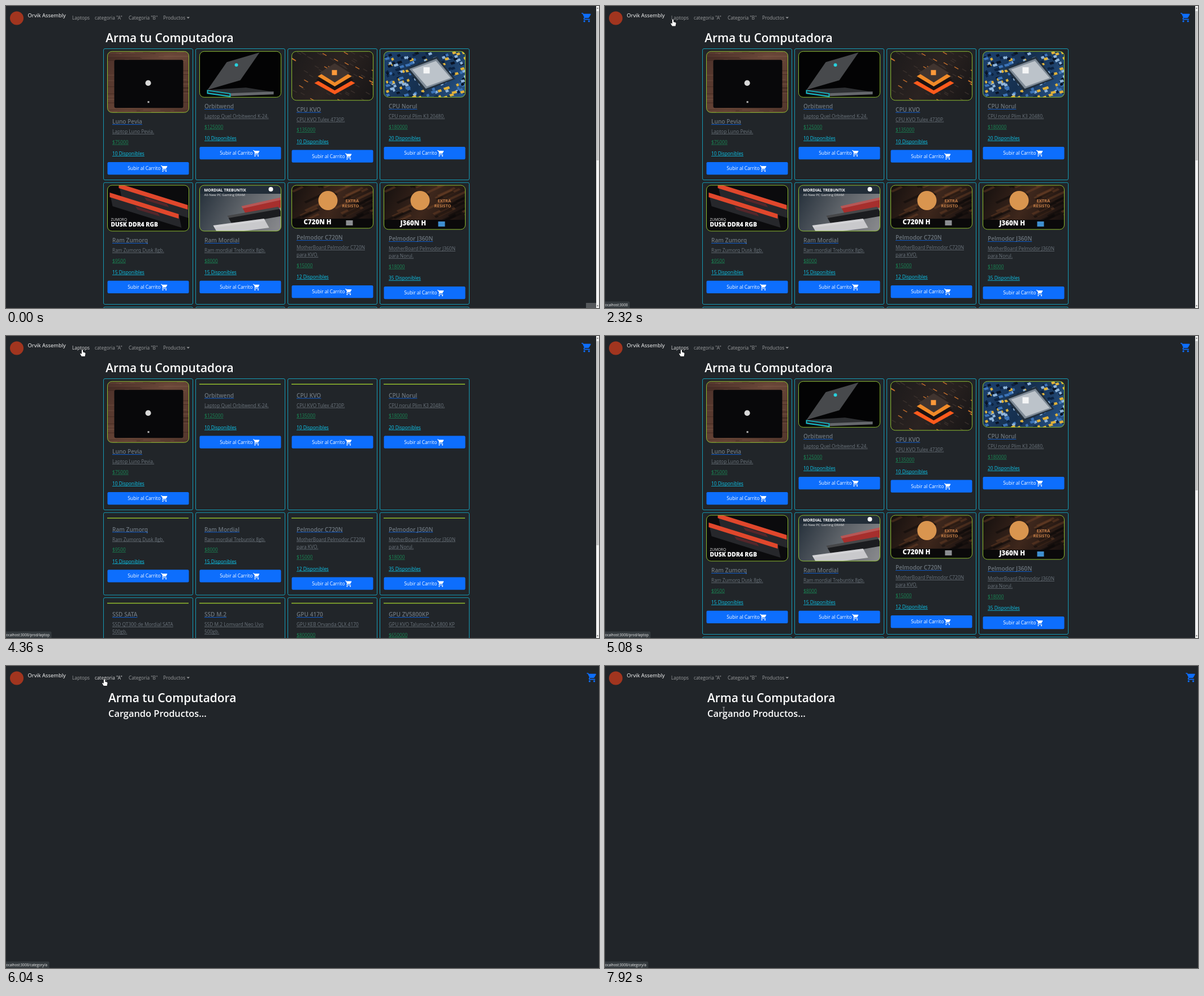
An HTML page with a canvas for the animation above (7.99 s loop, 1049 by 534 pixels).

```html
<!DOCTYPE html>
<html lang="es">
<head>
<meta charset="utf-8">
<title>Tienda</title>
<style>
html, body { margin: 0; width: 100%; height: 100%; overflow: hidden; background: #212529; }
canvas { display: block; }
</style>
</head>
<body>
<canvas id="stage" width="1049" height="534"></canvas>
<script>
const c = document.getElementById('stage').getContext('2d');
const LOOP = 7990, BG = '#212529', BLUE = '#0d6efd', CYAN = '#0dcaf0', GRAY = '#6c757d', GREEN = '#198754';
const FONT = '"Open Sans", "Noto Sans", sans-serif';
const PIC = 144, COL = 163, LINE = 13.3, FLAT = 8.5;
const HAND = new Path2D('M-1.1 1Q0-.6 1.1 1V4.6L4.4 5.4Q5.8 5.8 5.5 7.4L4.6 12H-1.2L-3.7 8Q-4 6.6-2.6 6.8L-1.1 8Z');
const ARROW = new Path2D('M0 0V11.5L2.6 9.2 4.3 13 6 12.2 4.3 8.6H7.8Z');
const CART = new Path2D('M1 2H4.3L5.2 4H20Q21.4 4.2 20.9 5.5L17.3 12Q16.7 13 15.5 13H8.1L7.2 14.7Q7.2 15 7.4 15H19V17H7Q4.5 16.6 5.2 14.1L6.6 11.6 3 4H1ZM5 20a2 2 0 1 0 4 0a2 2 0 1 0-4 0ZM15 20a2 2 0 1 0 4 0a2 2 0 1 0-4 0Z');

function rect(color, x, y, w, h, r = 0) {
  c.fillStyle = color;
  c.beginPath();
  c.roundRect(x, y, w, h, r);
  c.fill();
}

// Parallelogram from a corner and two edge vectors
function slab(color, x, y, ux, uy, vx, vy) {
  c.save();
  c.transform(ux, uy, vx, vy, x, y);
  rect(color, 0, 0, 1, 1);
  c.restore();
}

const diamond = (color, x, y, rx, ry) => slab(color, x - rx, y, rx, -ry, rx, ry);

function dot(color, x, y, r) {
  rect(color, x - r, y - r, 2 * r, 2 * r, r);
}

function text(s, x, y, size, color, weight = 400, line) {
  c.font = `${weight} ${size}px ${FONT}`;
  c.fillStyle = color;
  c.fillText(s, x, y);
  if (line) rect(line, x, y + 1, c.measureText(s).width, .7);
}

function cart(x, y, size, color) {
  c.save();
  c.translate(x, y);
  c.scale(size / 24, size / 24);
  c.fillStyle = color;
  c.fill(CART);
  c.restore();
}

function backdrop(h, ...colors) {
  const g = c.createLinearGradient(0, 0, PIC, h);
  colors.forEach((k, i) => g.addColorStop(i / (colors.length - 1), k));
  rect(g, 0, 0, PIC, h);
}

// Calls draw(x, y, rand) n times with a repeatable random source
function scatter(n, h, draw) {
  let seed = 77;
  const rand = () => (seed = (seed * 16807) % 2147483647) / 2147483647;
  for (let i = 0; i < n; i++) draw(rand() * PIC, rand() * h, rand);
}

// Product pictures
function blackLaptop(h) {
  backdrop(h, '#4b3029', '#6a4738', '#54372d');
  scatter(70, h, (x, y, r) => rect(r() < .5 ? '#35211b90' : '#86604e70', x - 30, y, 60, 1));
  rect('#08080a', 12, 15, 122, 85, 3);
  dot('#d8d8d8', 72, 56, 5);
  rect('#bbb', 71, 88, 3, 3);
}

function slateLaptop(h) {
  rect('#030304', 0, 0, PIC, h);
  slab('#47494c', 48, 19, 58, -17, -34, 49);
  slab('#2e3033', 14, 68, 68, -4, 50, 8);
  slab('#66696d', 55, 74, 76, -3, 0, 5);
  slab('#19b8c4', 13, 68, 42, 6, 0, 7);
  slab('#202225', 15, 70, 38, 5.5, 0, 3);
  dot('#28d0dc', 65, 24, 3);
}

function glowingChip(h) {
  backdrop(h, '#1c1a1b', '#2b2321', '#171516');
  scatter(70, h, (x, y, r) => slab(r() < .25 ? '#c8702c' : '#3a302c', x, y, 7, 4, -1, 1));
  ['#ff5a1c', '#1a1211', '#f08a28', '#40342f'].forEach((k, i) => diamond(k, 76, 56 - 6 * i, 36 - 3 * i, 20 - i));
  rect('#ff9a3a', 71, 33, 9, 9);
}

function silverChip(h) {
  backdrop(h, '#1d4270', '#16304f', '#28568c');
  const colors = ['#0a1425', '#3c74b8', '#0c2342', '#e0b23a', '#8fb4da'];
  scatter(200, h, (x, y, r) => slab(colors[Math.floor(r() * 5)], x, y, 5 * r() + 3, -2, 2, 4));
  ['#22303e', '#7e8a96', '#bcc3ca'].forEach((k, i) =>
    slab(k, 40 + 5 * i, 30 + i, 54 - 6 * i, -21 + 3 * i, 32 - 3 * i, 40 - 5 * i));
  rect('#f4f5f6', 70, 28, 11, 11);
}

function redMemory(h) {
  rect('#0b0b0d', 0, 0, PIC, h);
  for (let i = 0; i < 2; i++) {
    const x = 20 - 16 * i, y = 16 * i - 3;
    slab('#26272b', x, y, 122, 38, 5, 24);
    slab('#e0472c', x, y, 122, 38, 0, 8);
    slab('#55262a', x + 45, y + 24, 40, 12, 4, 6);
  }
  text('ZUMORQ', 6, 63, 6.5, '#ddd');
  text('DUSK DDR4 RGB', 6, 73, 10.3, '#fff', 800);
}

function threeMemory(h) {
  backdrop(h, '#222d38', '#5d6268', '#8a8b8e');
  ['#a62f2d', '#1b1c1f', '#c9c9cc'].forEach((k, i) => {
    const x = 74 - 25 * i, y = 37 + 17 * i;
    slab(k, x, y, 90, -20 + 4 * i, 9, 16);
    slab('#ffffff30', x, y, 90, -20 + 4 * i, 2, 4);
  });
  rect('#222d38', 0, 0, PIC, 15);
  text('MORDIAL TREBUNTIX', 8, 11, 7, '#fff', 700);
  text('All-New PC Gaming DRAM', 8, 19, 6, '#e4e6e8');
  dot('#fff', 126, 7, 4);
}

const boardBox = (label, x, badge) => h => {
  backdrop(h, '#15100f', '#3e271c', '#120d0d');
  scatter(40, h, (x, y, r) => slab(r() < .4 ? '#7c492a60' : '#0b080880', x, y, 30, -14, 3, 3));
  dot('#d9954f', 64, 27, 17);
  text('EXTRA', 95, 30, 7.5, '#c47f48', 700);
  text('RESISTO', 89, 39, 7.5, '#c47f48', 700);
  rect('#0a090a', 0, h - 17, PIC, 17);
  text(label, x, h - 7, 11.5, '#fff', 800);
  rect(badge, 96, h - 14, 12, 9);
};

// title, description, price, stock, picture height, picture
const PRODUCTS = [
  ['Luno Pevia', 'Laptop Luno Pevia.', '$75000', 10, 108, blackLaptop],
  ['Orbitwend', 'Laptop Quel Orbitwend K-24.', '$125000', 10, 81, slateLaptop],
  ['CPU KVO', 'CPU KVO Tulex 4730P.', '$135000', 10, 86.5, glowingChip],
  ['CPU Norul', 'CPU norul Plim K3 20480.', '$180000', 20, 81, silverChip],
  ['Ram Zumorq', 'Ram Zumorq Dusk 8gb.', '$9500', 15, 81, redMemory],
  ['Ram Mordial', 'Ram mordial Trebuntix 8gb.', '$8000', 15, 81, threeMemory],
  ['Pelmodor C720N', 'MotherBoard Pelmodor C720N\npara KVO.', '$15000', 12, 76, boardBox('C720N H', 21, '#8d8f93')],
  ['Pelmodor J360N', 'MotherBoard Pelmodor J360N\npara Norul.', '$18000', 35, 78, boardBox('J360N H', 29, '#3f8fd0')],
  ['SSD SATA', 'SSD QT300 de Mordial SATA\n500gb.', '$7000', 20],
  ['SSD M.2', 'SSD M.2 Lomvard Neo Uvo\n500gb.', '$9000', 20],
  ['GPU 4170', 'GPU KEB Orvanda QLX 4170', '$800000', 5],
  ['GPU ZV5800KP', 'GPU KVO Talumon Zv 5800 KP', '$650000', 5]
].map(([title, about, price, stock, height = 80, photo]) =>
  ({ title, lines: about.split('\n'), price, stock, height, photo }));

function outline(color, x, y, w, h, r) {
  c.beginPath();
  c.roundRect(x, y, w, h, r);
  c.lineWidth = .9;
  c.strokeStyle = color;
  c.stroke();
}

function picture(p, x, y) {
  c.save();
  c.translate(x, y);
  c.save();
  c.beginPath();
  c.roundRect(0, 0, PIC, p.height, 8);
  c.clip();
  p.photo(p.height);
  c.restore();
  outline('#9acd32', 0, 0, PIC, p.height, 8);
  c.restore();
}

function card(p, x, y, bottom, loaded) {
  outline('#16a9c4', x + .5, y + .2, 158, bottom - y, 2.5);
  if (!loaded) rect('#93bd2e', x + 7, y + 9.3, PIC, 1.4);
  else if (p.photo) picture(p, x + 7.5, y + 5);

  const left = x + 16;
  let b = y + 5 + (loaded ? p.height : FLAT);
  text(p.title, left, b + 20, 10.1, GRAY, 600, BLUE);
  p.lines.forEach((s, i) => text(s, left, b + 37 + LINE * i, 8.4, GRAY, 400, GRAY));
  b += LINE * (p.lines.length - 1);
  text(p.price, left, b + 55.5, 8.35, GREEN, 500, GREEN);
  text(p.stock + ' Disponibles', left, b + 76, 8.3, CYAN, 500, CYAN);
  rect(BLUE, x + 7.5, b + 87.8, PIC, 22.2, 2.2);
  c.textAlign = 'right';
  text('Subir al Carrito', x + 101.5, b + 101.8, 8.35, '#fff');
  c.textAlign = 'left';
  cart(x + 101.5, b + 92.5, 13.5, '#fff');
}

// A row is as tall as its tallest card
function cards(items, x, allLoaded) {
  let y = 75.3;
  for (let i = 0; i < items.length; i += 4) {
    const row = items.slice(i, i + 4);
    const loaded = k => allLoaded || i + k === 0;
    const bottom = y + 124 + Math.max(...row.map((p, k) =>
      (loaded(k) ? p.height : FLAT) + LINE * (p.lines.length - 1)));
    row.forEach((p, k) => card(p, x + COL * k, y, bottom, loaded(k)));
    y = bottom + 4.7;
  }
}

function scrollbar(end) {
  rect('#f1f1f1', 1044, 0, 5, 534);
  rect('#c1c1c1', 1044.5, 9, 4, end - 9);
  diamond('#777', 1046.5, 4, 1.5, 1.5);
  diamond('#777', 1046.5, 530, 1.5, 1.5);
}

const clamp = v => Math.max(0, Math.min(1, v));
const hover = (t, on, off) => .55 + .28 * (clamp((t - on) / 150) - clamp((t - off) / 100));

function navbar(t, cartX) {
  dot('#a1351f', 19, 21.5, 12);
  text('Orvik Assembly', 38.5, 19.7, 9.4, '#fff');
  const link = (s, x, a = .55) => text(s, x, 24, 8.3, `rgba(255,255,255,${a})`);
  link('Laptops', 117, hover(t, 2330, 5300));
  link('categoria "A"', 157, hover(t, 5560, 7620));
  link('Categoria "B"', 217);
  link('Productos', 278);
  c.fill(new Path2D('M319.5 19.5h5.5l-2.75 2.8z'));
  cart(cartX, 10.5, 19.7, BLUE);
}

function status(t) {
  if (t < 1300) return;
  const s = 'localhost:3000' + (t < 2390 ? '' : t < 5620 ? '/prod/laptop' : '/category/a');
  c.font = `400 6.2px ${FONT}`;
  rect('#343a3e', 0, 522.5, c.measureText(s).width + 2, 12, [0, 2, 0, 0]);
  text(s, -1.5, 530.5, 6.2, '#f2f2f2');
}

// Pointer moves: start, end, x, y reached
const MOVES = [
  [70, 830, 92, 24], [900, 1100, 66, 22], [1920, 2670, 135, 24],
  [5410, 5830, 174, 23], [7510, 7920, 210, 78]
];

function pointer(t) {
  if (t < 70) return;
  let x = 1040, y = 522;
  for (const [from, to, tx, ty] of MOVES) {
    const u = 1 - (1 - clamp((t - from) / (to - from))) ** 2;
    x += (tx - x) * u;
    y += (ty - y) * u;
  }
  c.save();
  c.translate(x, y);
  if (t > 7700) {
    rect('#c4c6c8', -.4, -5, .9, 10);
    rect('#c4c6c8', -2, -5.5, 4, .8);
    rect('#c4c6c8', -2, 4.7, 4, .8);
  } else {
    const shape = t < 850 ? ARROW : HAND;
    c.lineWidth = 1;
    c.strokeStyle = '#111';
    c.stroke(shape);
    c.fillStyle = '#fff';
    c.fill(shape);
  }
  c.restore();
}

function draw(t) {
  rect(BG, 0, 0, 1049, 534);
  const store = t < 2880 || (t >= 4360 && t < 5350);
  const laptops = t >= 6790 && t < 7650;
  const loaded = t < 2880 || t >= 4620;
  const shift = store ? 0 : 4.7;
  navbar(t, store ? 1017.3 : 1026.6);
  text('Arma tu Computadora', 176.3 + shift, 64, 20.9, '#fff', 600);
  if (store) {
    cards(PRODUCTS, 172, loaded);
    scrollbar(loaded ? 273 : 370);
  } else if (laptops) cards(PRODUCTS.slice(0, 2), 172 + shift, true);
  else text('Cargando Productos...', 181, 90.3, 16.4, '#fff', 600);
  if (t < 70) rect('#55585b', 1026, 525, 18, 9);
  status(t);
  pointer(t);
}

const start = performance.now();
function tick() {
  draw((performance.now() - start) % LOOP);
  requestAnimationFrame(tick);
}
tick();
</script>
</body>
</html>
```
